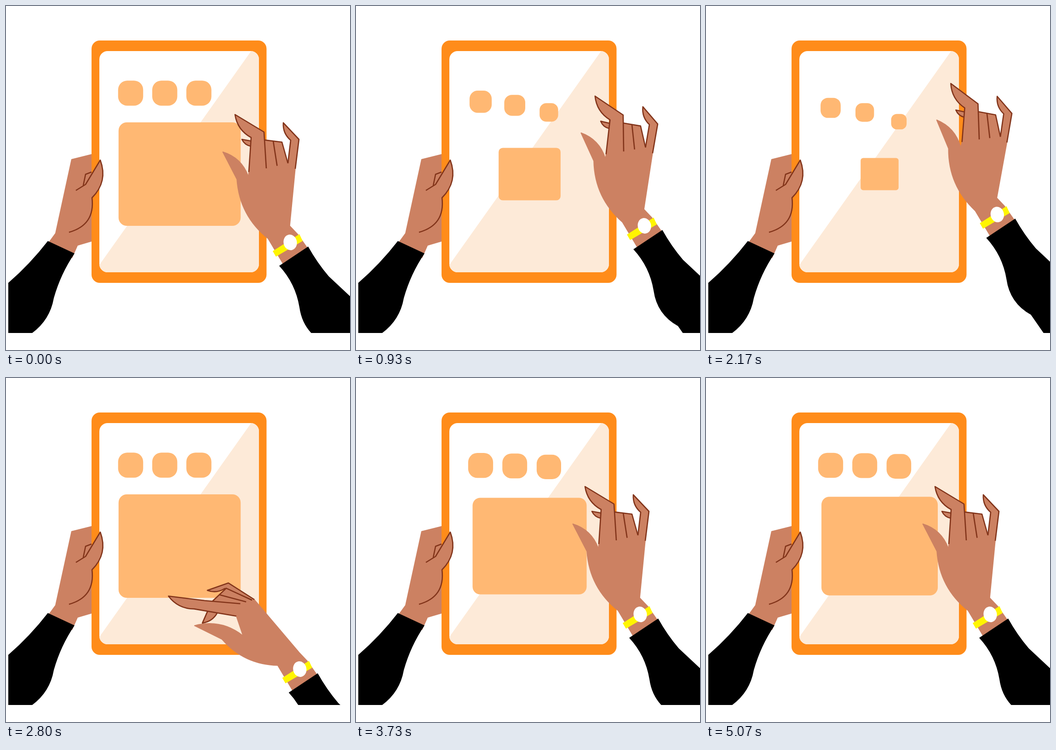
Recreate the animation shown at these times as an HTML page with a canvas. Size 748x748 px, loop 5.11 s.

```html
<!DOCTYPE html>
<html lang="en">
<head>
<meta charset="utf-8">
<title>Tablet swipe</title>
<style>
  html, body { margin: 0; width: 100%; height: 100%; overflow: hidden; background: #fff; }
  canvas { display: block; width: 100vw; height: 100vh; }
</style>
</head>
<body>
<canvas id="stage" width="748" height="748"></canvas>
<script>
const ctx = document.getElementById('stage').getContext('2d');
const LOOP = 5110, CYCLE = 32;
const SKIN = '#cc8162', LINE = '#82341a', ORANGE = '#ff8c1a', TILE = '#ffb873';

function ease(n, from, to) {
  const u = Math.min(1, Math.max(0, (n - from) / (to - from)));
  return u * u * (3 - 2 * u);
}
const along = (a, b, u) => [a[0] + (b[0] - a[0]) * u, a[1] + (b[1] - a[1]) * u];
const bow = (p, k) => [p[0], p[1], k];

// Points are [x, y, k]; k bows the edge that leads to the point.
function trace(points) {
  ctx.beginPath();
  points.forEach(([x, y, k = 0], i) => {
    if (!i) return ctx.moveTo(x, y);
    const [px, py] = points[i - 1];
    ctx.quadraticCurveTo((px + x) / 2 - (y - py) * k, (py + y) / 2 + (x - px) * k, x, y);
  });
}
function fill(points, color) {
  trace(points);
  ctx.fillStyle = color;
  ctx.fill();
}
function stroke(points, color = LINE, width = 2.6) {
  trace(points);
  ctx.strokeStyle = color;
  ctx.lineWidth = width;
  ctx.stroke();
}
function outlined(points) {
  fill(points, SKIN);
  stroke(points);
}
function roundBox(x, y, w, h, r, color) {
  ctx.beginPath();
  ctx.roundRect(x, y, w, h, r);
  ctx.fillStyle = color;
  ctx.fill();
}

// Tiles fly up one after another, then grow back, each slower than the last.
function drawTile(i, n) {
  const card = i === 3;
  const start = 19 + 0.07 * i ** 3, rate = 0.78 * 0.853 ** i;
  const left = n > start ? 2 ** (-rate * (n - start)) : 0;
  const up = n > start ? 0 : Math.max(0, 64 * 2 ** (0.88 * (n - 16)) / 1.6 ** i - 0.8);
  const scale = 1 - left;
  const w = (card ? 265.5 : 54.5) * scale, h = (card ? 225 : 54.5) * scale;
  const x = card ? 377.5 : 271 + 74.2 * i;
  const y = card ? 365.5 - up : 189.5 - up + 162 * left;
  ctx.globalAlpha = Math.max(0, 1 - up / 250);
  roundBox(x - w / 2, y - h / 2, w, h, (card ? 18 : 20) * scale, TILE);
  ctx.globalAlpha = 1;
}

function drawTablet(n) {
  roundBox(186, 75, 380.5, 527, 18, ORANGE);
  roundBox(203, 98, 347, 481, 18, '#fff');
  ctx.save();
  ctx.clip();
  fill([[533, 98], [560, 98], [560, 590], [203, 590], [203, 563]], '#fdead8');
  for (let i = 0; i < 4; i++) drawTile(i, n);
  ctx.restore();
}

function drawLeftPalm() {
  fill([[142, 333], [190, 321], [190, 511], [156, 521], [144, 548], [88, 520], [107, 494]], SKIN);
}

function drawLeftThumb() {
  outlined([[152, 401], [173, 388], [205, 335], [187, 417, -0.32], [137, 492, -0.43]]);
  stroke([[168, 390], [173, 366], [186, 361]]);
  fill([[91, 511], [149, 538], [104, 635, 0.08], [57, 711, -0.2],
    [5, 711], [5, 602], [91, 511, 0.05]], '#000');
}

// Joints: x, y with the hand curled, then with it pointing (if that differs).
const joints = {
  index: { tip: [498, 236, 341, 495], knuckle: [561, 274, 420, 494], root: [566, 353, 498, 490],
    pad: [533, 286, 400, 515], crook: [528, 361, 493, 518] },
  pinky: { tip: [603, 254, 423, 471], knuckle: [637, 290, 466, 449], root: [629, 354, 527, 477],
    pad: [619, 292, 460, 462], crook: [613, 342, 522, 479] },
  rest: { ring: [600, 296, 463, 461], middle: [513, 290, 422, 543],
    thumb: [471, 317], web: [527, 370, 513, 558], heel: [502, 377] }
};
const WRIST = [586, 494], POINT_WRIST = [611, 598], POINT_TURN = 44.1;

function turned(x, y, deg) {
  const c = Math.cos(deg * Math.PI / 180), s = Math.sin(deg * Math.PI / 180);
  return [x * c - y * s, x * s + y * c];
}

function place(group, open, angle) {
  const out = {};
  for (const name in group) {
    const [x, y, px, py] = group[name];
    const curled = [x - WRIST[0], y - WRIST[1]];
    const pointing = px === undefined ? curled
      : turned(px - POINT_WRIST[0], py - POINT_WRIST[1], POINT_TURN);
    const [rx, ry] = turned(...along(curled, pointing, open), angle);
    out[name] = [rx + WRIST[0], ry + WRIST[1]];
  }
  return out;
}

const drawFinger = f => outlined([f.root, f.knuckle, f.tip, bow(f.pad, 0.25), f.crook]);

function drawHand(open, angle) {
  const index = place(joints.index, open, angle);
  const pinky = place(joints.pinky, open, angle);
  const { ring, middle, thumb, web, heel } = place(joints.rest, open, angle);

  const palm = [thumb, bow(web, -0.25), index.crook, index.root, pinky.crook, pinky.root,
    [617, 478], [634, 496], [660, 533], [607, 568], [570, 506], bow(heel, -0.22), thumb];
  fill(palm, SKIN);
  stroke(palm, SKIN, 1.5);

  outlined([along(index.pad, index.crook, 0.1 + 0.22 * open), middle,
    bow(along(index.pad, index.crook, 0.25 + 0.3 * open), 0.25)]);
  drawFinger(pinky);
  const fold = along(index.knuckle, index.root, 0.22);
  fill([fold, ring, pinky.crook, index.root], SKIN);
  stroke([fold, ring, pinky.crook]);
  stroke([along(fold, ring, 0.5), along(index.root, pinky.crook, 0.5)]);
  drawFinger(index);
}

function drawSleeve() {
  fill([[594, 565], [657, 523], [702, 588, 0.05], [748, 631], [860, 740], [780, 860],
    [691, 732], [638, 655, -0.25], [594, 565, 0.15]], '#000');
}

function drawWatch() {
  fill([[580, 533], [638, 496], [645, 511], [587, 545]], '#fff500');
  ctx.beginPath();
  ctx.ellipse(618, 514, 14.5, 17, -0.2, 0, 2 * Math.PI);
  ctx.fillStyle = '#fff';
  ctx.fill();
}

// Reach down, swipe up, return to rest.
function drawRightArm(n) {
  const sink = ease(n, 0, 7), tilt = ease(n, 0, 9);
  const swipe = ease(n, 9.5, 17.5), away = 1 - ease(n, 17.5, 25.7);
  const open = ease(n, 0, 6) * (1 - ease(n, 17, 23));
  ctx.save();
  ctx.beginPath();
  ctx.rect(0, 0, 748, 711);
  ctx.clip();
  ctx.translate((22 * sink + 14 * swipe) * away, (126 * sink - 268 * swipe) * away);
  drawHand(open, (60 * swipe - 49 * tilt) * away);
  drawSleeve();
  drawWatch();
  ctx.restore();
}

function draw(now) {
  // 25 poses a second, shown on a 30 Hz clock
  const tick = Math.floor((now % LOOP + 4) * 0.03);
  const n = Math.floor(tick * 5 / 6) % CYCLE;
  ctx.fillStyle = '#fff';
  ctx.fillRect(0, 0, 748, 748);
  drawLeftPalm();
  drawTablet(n);
  drawLeftThumb();
  drawRightArm(n);
}

const begin = performance.now();
function loop() {
  draw(performance.now() - begin);
  requestAnimationFrame(loop);
}
ctx.lineJoin = 'round';
loop();
</script>
</body>
</html>
```
